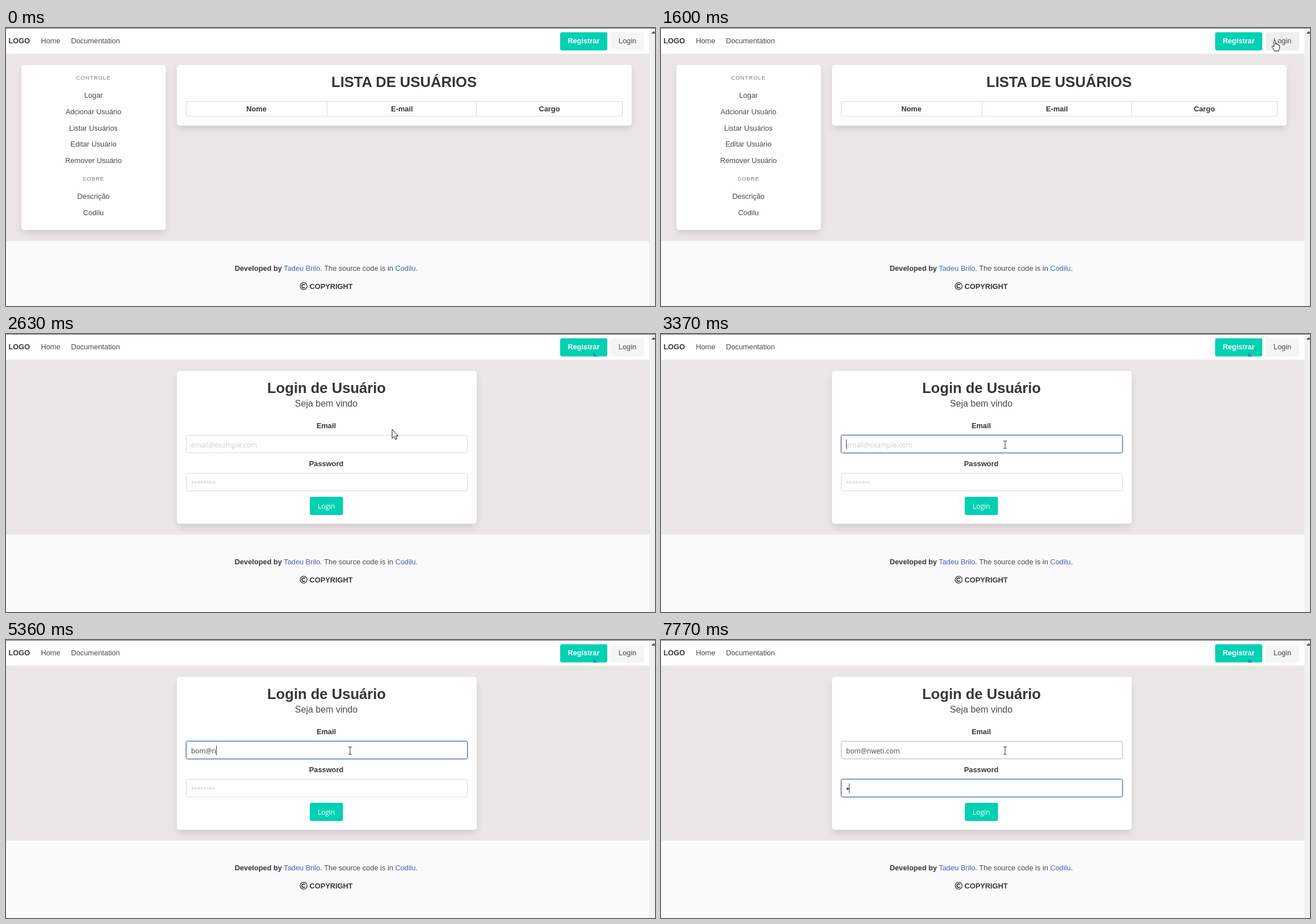
Animation, 1143 px wide and 490 px high, one loop 8000 ms. Source, as an HTML page:

```html
<!DOCTYPE html>
<html lang="pt">
<head>
<meta charset="utf-8">
<title>Login de Usuário</title>
<style>
  html, body { margin: 0; height: 100%; overflow: hidden; background: #eae6e5; }
  svg { display: block; width: 100vw; height: 100vh; }
  text { font: 12.8px "Liberation Sans", Arial, sans-serif; fill: #4a4a4a; white-space: pre; }
  .mid { text-anchor: middle; }
  .bold { font-weight: bold; fill: #363636; }
  .title { font-size: 25.6px; }
  .subtitle { font-size: 16px; }
  .label { font-size: 9.6px; letter-spacing: .96px; fill: #7a7a7a; }
  .ui { font: 12px "Open Sans", "Noto Sans", sans-serif; }
  .hint { fill: #cfcfcf; }
  .stars { font-size: 13.7px; }
  .white { fill: #fff; }
  .shadow { fill: #0a0a0a; opacity: .13; filter: blur(6.4px); }
  .card, .field { fill: #fefefe; }
  .field { stroke: #dbdbdb; }
  .field.hover { stroke: #b5b5b5; }
  .field.focus { stroke: #485fc7; }
  .ring { fill: none; stroke: #485fc7; stroke-opacity: .25; stroke-width: 1.6; }
  .link { fill: #3f6db8; }
  .login .link { fill: #485fc0; }
  .grid { fill: none; stroke: #dbdbdb; }
  .pointer { fill: #fff; stroke: #111; stroke-linejoin: round; }
</style>
</head>
<body>
<svg id="stage" viewBox="0 0 1143 490" preserveAspectRatio="none">
  <rect width="1143" height="490" fill="#eae6e5"/>
  <rect width="1133" height="45.5" fill="#fefefe"/>

  <text class="bold" x="4.5" y="27">LOGO</text>
  <text x="61.5" y="27">Home</text>
  <text x="114.5" y="27">Documentation</text>
  <rect id="register" x="976" y="7.5" width="83" height="32" rx="3.2"/>
  <text class="mid bold white" x="1017.3" y="27">Registrar</text>
  <rect id="signIn" x="1065" y="7.5" width="59" height="32" rx="3.2"/>
  <text class="mid" x="1094.5" y="27">Login</text>
  <path id="smudge" d="M1034 32l8 8h-8z" fill="#2489b4" opacity=".75"/>

  <g id="footer">
    <rect y="375.5" width="1133" height="140" fill="#fafafa"/>
    <text class="mid" x="564" y="427.5"><tspan class="bold">Developed by</tspan> <tspan class="link">Tadeu Brilo</tspan>. The source code is in <tspan class="link">Codilu</tspan>.</text>
    <g fill="none" stroke="#3b2d40">
      <circle cx="524.2" cy="455" r="6.1" stroke-width="1.3"/>
      <path d="M526.6 453a3.1 3.1 0 1 0 0 4" stroke-width="1.8"/>
    </g>
    <text class="bold" x="534.5" y="459.5">COPYRIGHT</text>
  </g>

  <g id="listView">
    <g id="menu"></g>
    <text class="mid bold title" x="701" y="104">LISTA DE USUÁRIOS</text>
    <path class="grid" d="M317.5 129.5H1085.5V155.5H317.5ZM565.5 129.5V155.5M828.5 129.5V155.5"/>
    <text class="mid bold" x="441" y="146.5">Nome</text>
    <text class="mid bold" x="697.3" y="146.5">E-mail</text>
    <text class="mid bold" x="957" y="146.5">Cargo</text>
  </g>

  <g id="loginView">
    <text class="mid bold title" x="564.5" y="104">Login de Usuário</text>
    <text class="mid subtitle" x="564" y="128">Seja bem vindo</text>
    <text class="mid bold" x="564" y="165.5">Email</text>
    <text class="mid bold" x="564" y="233">Password</text>
    <rect id="ring" class="ring" x="316.2" width="497.6" height="33.6" rx="3.8"/>
    <rect id="email" class="field" x="317.5" y="178.5" width="495" height="31" rx="3"/>
    <rect id="password" class="field" x="317.5" y="245.5" width="495" height="31" rx="3"/>
    <text id="emailHint" class="ui hint" x="326" y="199.5">email@example.com</text>
    <text id="emailText" class="ui" x="326" y="199.5"></text>
    <text id="passwordHint" class="hint stars" x="326" y="267.5">********</text>
    <circle id="dot" cx="328.7" cy="262.3" r="2" fill="#4a4a4a"/>
    <rect id="caret" width="1" height="17" fill="#363636"/>
    <rect x="535" y="287" width="58.5" height="32" rx="3.2" fill="#00d1b2"/>
    <text class="mid ui white" x="564.2" y="307.5">Login</text>
  </g>

  <rect x="1133" width="10" height="490" fill="#f1f1f1"/>
  <path d="M1136.5 10l4-4.5 4 4.5z" fill="#56507e"/>
  <rect width="1143" height="1" fill="#6a686b"/>

  <g id="cursor">
    <path id="arrow" class="pointer" d="M0 0V16L3.7 12.6 6 18 8.3 17 6 11.7H11Z"/>
    <path id="hand" class="pointer" d="M-1.5 10.5V1.5a1.5 1.5 0 0 1 3 0V7c0-1.5 2.5-1.5 2.5 0v.6c0-1.3 2.4-1.3 2.4.2v.8c.3-1.2 2-1 2 .4V13c0 2-1.4 3-1.4 5.5h-8C-1.2 16-3.5 14-5 11.5c-.8-1.5 1-2.5 2-1.3z"/>
    <path id="beam" d="M-3 -6.5H-1L0 -6 1 -6.5H3M0 -6V6M-3 6.5H-1L0 6 1 6.5H3" fill="none" stroke="#333"/>
  </g>
</svg>
<script>
const LOOP = 8000, LOGIN_AT = 1810, FOCUS_AT = 2840, TAB_AT = 7180, DOT_AT = 7770;
const BLINK = 532, STEP = 68;
const ADDRESS = "bom@nweti.com";
const KEYS = [3770, 4100, 4300, 4960, 5360, 5500, 5630, 5770, 5960, 6160, 6230, 6370, 6500];
const CURSOR_IN = [320, 1113, 465];
// start, duration, x, y
const MOVES = [[320, 680, 1073, 20], [1140, 0, 1078, 14], [1210, 0, 1081, 22], [2202, 544, 606, 195]];

const $ = id => document.getElementById(id);
const show = (id, on) => { $(id).style.display = on ? "" : "none"; };
const set = (id, attrs) => { for (const k in attrs) $(id).setAttribute(k, attrs[k]); };
const inside = (p, x, y, w, h) => p.x >= x && p.x < x + w && p.y >= y && p.y < y + h;

function addCard(view, x, y, w, h) {
  $(view).insertAdjacentHTML("afterbegin",
    `<rect class="shadow" x="${x + 1.6}" y="${y + 8}" width="${w - 3.2}" height="${h - 3.2}" rx="4.8"/>
     <rect class="card" x="${x}" y="${y}" width="${w}" height="${h}" rx="4.8"/>`);
}
addCard("listView", 27, 65, 254.5, 291);
addCard("listView", 301, 65, 801, 107);
addCard("loginView", 301, 65, 528, 269.5);

function addMenu(label, labelY, items) {
  const line = (text, y, cls = "") => `<text class="mid ${cls}" x="154" y="${y}">${text}</text>`;
  $("menu").innerHTML += line(label, labelY, "label") +
    items.map((item, i) => line(item, labelY + 32 + i * 28.8)).join("");
}
addMenu("CONTROLE", 91, ["Logar", "Adcionar Usuário", "Listar Usuários", "Editar Usuário", "Remover Usuário"]);
addMenu("SOBRE", 269, ["Descrição", "Codilu"]);

function cursorAt(t) {
  let [, x, y] = CURSOR_IN;
  for (const [start, duration, toX, toY] of MOVES) {
    if (t < start) break;
    const elapsed = Math.floor((t - start) / STEP) * STEP;
    const p = duration ? Math.min(1, elapsed / duration) : 1;
    const eased = p * p * (3 - 2 * p);
    x += (toX - x) * eased;
    y += (toY - y) * eased;
  }
  return { x, y };
}

function drawCursor(t, login) {
  const p = cursorAt(t), visible = t >= CURSOR_IN[0];
  const onRegister = visible && inside(p, 976, 8, 83, 32);
  const onSignIn = visible && inside(p, 1065, 8, 59, 32);
  const onEmail = login && inside(p, 317, 178, 496, 32);
  set("register", { fill: onRegister ? "#00c4a7" : "#00d1b2" });
  set("signIn", { fill: onSignIn ? "#eee" : "#f5f5f5" });
  $("email").classList.toggle("hover", onEmail);
  set("cursor", { transform: `translate(${Math.round(p.x)} ${Math.round(p.y)})` });
  show("cursor", visible);
  show("hand", onRegister || onSignIn);
  show("beam", onEmail);
  show("arrow", !onRegister && !onSignIn && !onEmail);
  show("smudge", t >= 2400);
}

function drawForm(t) {
  const typed = KEYS.filter(k => t >= k).length;
  const focused = t >= FOCUS_AT, inPassword = t >= TAB_AT, dot = t >= DOT_AT;
  $("emailText").textContent = ADDRESS.slice(0, typed);
  show("emailHint", !typed);
  show("passwordHint", !dot);
  show("dot", dot);
  $("email").classList.toggle("focus", focused && !inPassword);
  $("password").classList.toggle("focus", inPassword);
  show("ring", focused);
  set("ring", { y: inPassword ? 244.2 : 177.2 });

  const lastInput = Math.max(...[FOCUS_AT, ...KEYS, TAB_AT, DOT_AT].filter(k => t >= k));
  const typedWidth = inPassword ? (dot ? 5 : 0) : typed && $("emailText").getComputedTextLength();
  show("caret", focused && (t - lastInput) % (2 * BLINK) < BLINK);
  set("caret", { x: Math.round(326 + typedWidth), y: inPassword ? 253 : 186 });
}

function draw(t) {
  const login = t >= LOGIN_AT;
  $("stage").classList.toggle("login", login);
  show("listView", !login);
  show("loginView", login);
  set("footer", { transform: `translate(0 ${login ? -22 : 0})` });
  drawForm(t);
  drawCursor(t, login);
}

const begin = performance.now();
(function frame() {
  draw((performance.now() - begin) % LOOP);
  requestAnimationFrame(frame);
})();
</script>
</body>
</html>
```
